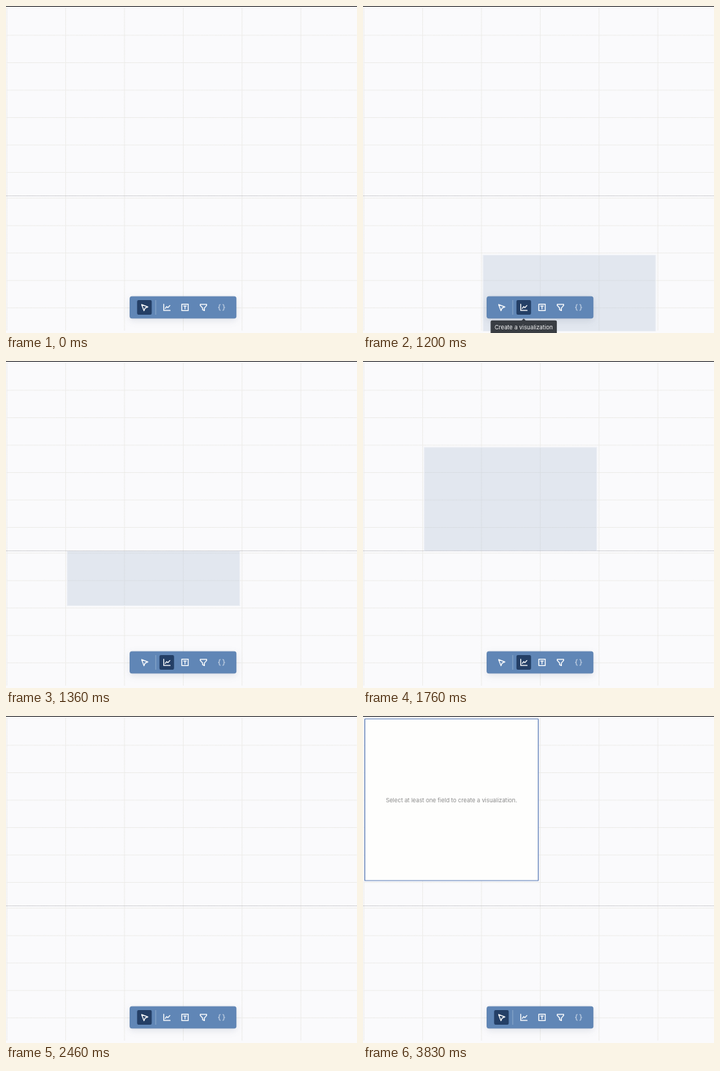
An HTML page that plays this animation: 480 px wide and 447 px high, repeating every 5.03 s.

```html
<!DOCTYPE html>
<html lang="en">
<head>
<meta charset="utf-8">
<title>Canvas grid</title>
<style>
  html, body { margin: 0; width: 100%; height: 100%; overflow: hidden; background: #fafafc; }
  svg { display: block; width: 100%; height: 100%; }
  text { font: 7.9px Inter, "Open Sans", sans-serif; text-anchor: middle; }
  .grid { stroke: #e9e8e4; stroke-width: 1; stroke-dasharray: 1.4 .5; fill: none; }
  .icon { fill: none; stroke: #fff; stroke-width: 1.25; stroke-linejoin: round; stroke-linecap: round; }
  #bar { filter: drop-shadow(0 3px 5px rgba(60, 80, 110, .13)); }
</style>
</head>
<body>
<svg viewBox="0 0 480 447">
  <defs>
    <clipPath id="upper"><rect y="2" width="480" height="257.5"/></clipPath>
    <clipPath id="lower"><rect y="260" width="480" height="184.5"/></clipPath>
  </defs>
  <rect width="480" height="447" fill="#fafafc"/>
  <path id="grid" class="grid"/>
  <path d="M0 259.5H480" stroke="#cbcbce" stroke-dasharray="1.5 .4"/>
  <rect width="480" height="1" fill="#242428"/>

  <g id="clip">
    <rect id="ghost" width="236" height="219.5" fill="#becadc" fill-opacity=".42" stroke="#edf0f5" stroke-width="1"/>
  </g>

  <g id="card">
    <rect id="frame" x="2.5" y="4" width="237.2" height="221" rx=".6" fill="#fefefd" stroke-width="1.2"/>
    <text x="121" y="117.6" fill="#8b8b8b">Select at least one field to create a visualization.</text>
  </g>

  <g id="bar"><rect x="169.5" y="397.2" width="145.2" height="29.6" rx="2.5" fill="#6086b6" stroke="#557bad" stroke-width=".8"/></g>
  <rect id="hover" x="209.8" y="402" width="20" height="20" rx="2" fill="#4b72a5"/>
  <rect id="active" y="402" width="20" height="20" rx="2" fill="#243f66"/>
  <path d="M204.8 402V422" stroke="#8ba7cb"/>
  <path class="icon" d="M185.5 408.2 194 411.3 190.3 412.8 188.7 416.6Z"/>
  <path class="icon" d="M215.7 407.7V416.2H224.4M217.8 413.3 219.8 411 221.4 412.4 224.1 409.4"/>
  <path class="icon" d="M240.4 407.7H249.2V416.3H240.4ZM242.9 410H246.7M244.8 410V414.1"/>
  <path class="icon" d="M265.6 407.9H274.4V409.4L271.3 412.8V416.4L268.8 415.1V412.8L265.6 409.4Z"/>
  <path class="icon" stroke-opacity=".55" d="M293 408.1Q291.7 408.1 291.7 409.5V410.7Q291.7 412 290.5 412Q291.7 412 291.7 413.3V414.6Q291.7 415.9 293 415.9M296.6 408.1Q297.9 408.1 297.9 409.5V410.7Q297.9 412 299.1 412Q297.9 412 297.9 413.3V414.6Q297.9 415.9 296.6 415.9"/>

  <g id="tip">
    <path d="M217 430 219.8 427.2 222.6 430Z" fill="#393d43"/>
    <rect x="174.5" y="429.7" width="90.6" height="20" rx="2" fill="#393d43"/>
    <text x="219.8" y="441.8" fill="#f4f4f5">Create a visualization</text>
  </g>
</svg>
<script>
const LOOP = 5030;
const $ = id => document.getElementById(id);
const set = (id, name, value) => $(id).setAttribute(name, value);
const show = (id, opacity) => { $(id).style.opacity = opacity; };

const columns = [1, 2, 3, 4, 5, 6].map(i => 80.4 * i - 79.2);
const rows = [40, 262.7].flatMap((top, page) =>
  Array.from({ length: page ? 5 : 6 }, (_, i) => top + 37.5 * i));
set('grid', 'd', columns.map(x => `M${x} 3V444`).join('') + rows.map(y => `M1 ${y}H480`).join(''));

// time, column, top, page
const ghostSteps = [
  [1030, 2, 415.5, 'lower'],
  [1090, 2, 378, 'lower'],
  [1160, 2, 340.5, 'lower'],
  [1260, 2, 265.5, 'lower'],
  [1310, 1, 190, 'lower'],
  [1360, 1, 115, 'lower'],
  [1400, 1, 193, 'upper'],
  [1660, 1, 155.5, 'upper'],
  [1760, 1, 118, 'upper'],
  [1800, 0, 43, 'upper'],
  [1860, 0, 5, 'upper'],
  [2460, 0, 5, null]
];

// Progress from 0 to 1 in 50 ms steps, the first one visible at the start.
function fade(t, start, count) {
  const step = Math.floor((t - start) / 50) + 1;
  return Math.min(Math.max(step / count, 0), 1);
}

function mix(a, b, p) {
  return `rgb(${a.map((v, i) => Math.round(v + (b[i] - v) * p))})`;
}

function render(t) {
  const ghost = ghostSteps.findLast(step => step[0] <= t);
  const visible = ghost && ghost[3];
  show('ghost', visible ? 1 : 0);
  if (visible) {
    set('ghost', 'x', 3.3 + 80.4 * ghost[1]);
    set('ghost', 'y', ghost[2]);
    set('clip', 'clip-path', `url(#${visible})`);
  }

  const placing = t >= 800 && t < 2460;
  set('active', 'x', placing ? 209.8 : 179.3);
  show('hover', t < 800 ? fade(t, 60, 4) : 0);
  show('tip', fade(t, 110, 6) * (1 - fade(t, 1260, 2)));

  show('card', t >= 2830 ? 1 : 0);
  set('frame', 'stroke', mix([66, 90, 131], [101, 132, 187], fade(t, 3530, 7)));
}

function tick() {
  render(performance.now() % LOOP);
  requestAnimationFrame(tick);
}
tick();
</script>
</body>
</html>
```
